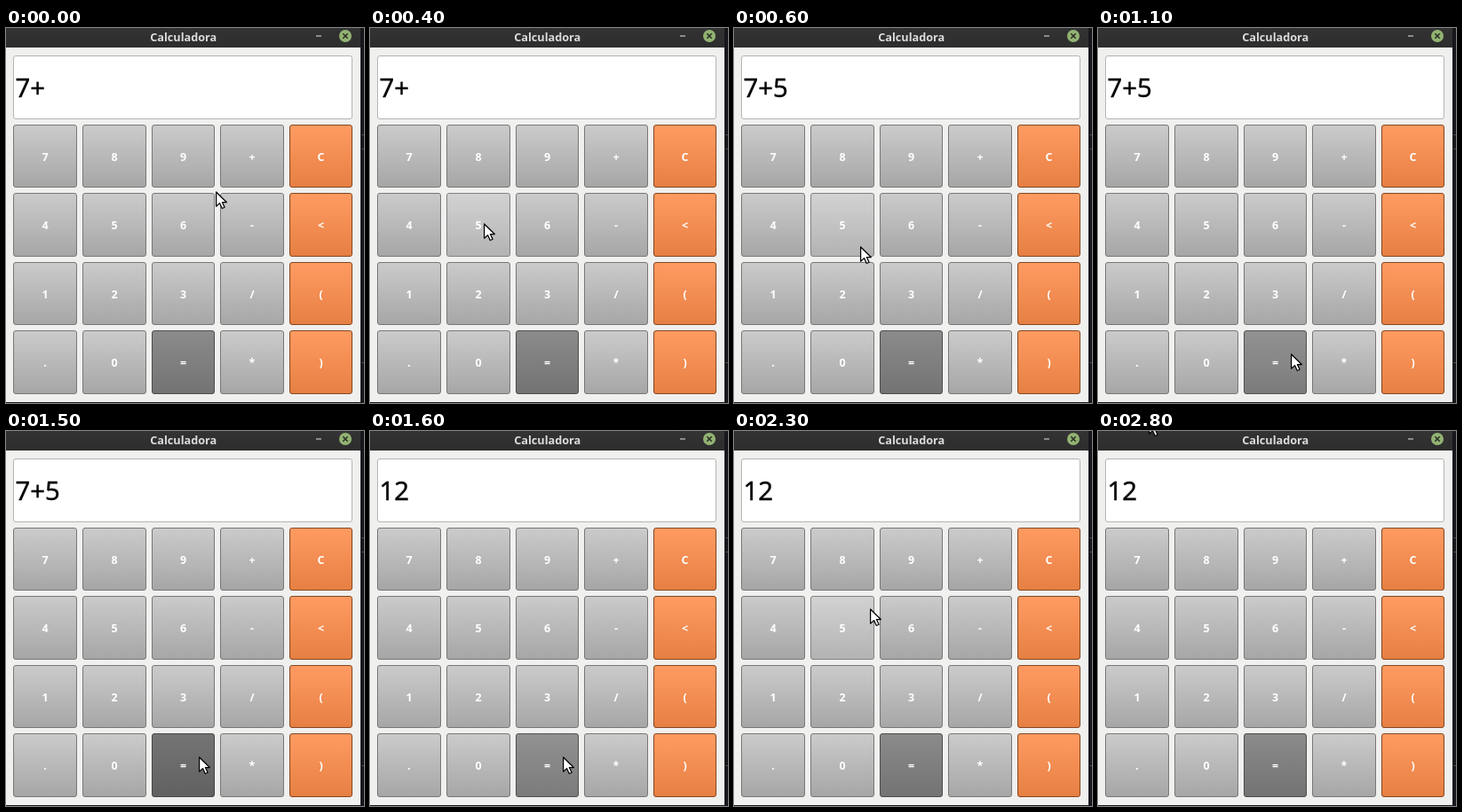
An HTML page that plays this animation: 403x423 px, repeating every 3200 ms.

```html
<!DOCTYPE html>
<html lang="pt">
<head>
<meta charset="utf-8">
<title>Calculadora</title>
<style>
  html, body { margin: 0; width: 100%; height: 100%; overflow: hidden; background: #18151b; }
  svg { display: block; width: 403px; height: 423px; font-family: "Noto Sans", "Open Sans", sans-serif; }
  .key rect { rx: 2.5px; stroke-width: 1; }
  .key text { font-size: 12.5px; font-weight: 700; fill: #fff; text-anchor: middle; }
  .plain rect { fill: url(#plain); stroke: #777; }
  .warm rect { fill: url(#warm); stroke: #84461f; }
  .dark rect { fill: url(#dark); stroke: #4c4c4c; }
  .key .glow { fill: #fff; fill-opacity: 0; stroke: none; }
  .key.hover .glow { fill-opacity: .14; }
  .dark.hover .glow { fill-opacity: .06; }
  .key.down .glow { fill: #000; fill-opacity: .16; }
</style>
</head>
<body>
<svg viewBox="0 0 403 423">
  <defs>
    <linearGradient id="plain" x2="0" y2="1"><stop stop-color="#cbcbcb"/><stop offset="1" stop-color="#a6a6a6"/></linearGradient>
    <linearGradient id="warm" x2="0" y2="1"><stop stop-color="#ff9b62"/><stop offset="1" stop-color="#e67f43"/></linearGradient>
    <linearGradient id="dark" x2="0" y2="1"><stop stop-color="#8b8b8b"/><stop offset="1" stop-color="#737373"/></linearGradient>
    <linearGradient id="bar" x2="0" y2="1"><stop stop-color="#333"/><stop offset="1" stop-color="#2d2d2d"/></linearGradient>
  </defs>

  <rect width="403" height="423" fill="#18151b"/>
  <path d="M400 120.5h3M400 136.5h3M400 377.5h3" stroke="#4a474e"/>
  <rect y="22" width="399" height="400" fill="#f0f0ef"/>
  <rect width="399" height="22" fill="url(#bar)"/>
  <text x="199.7" y="15" font-size="12.7" font-weight="600" fill="#dcdcdc" text-anchor="middle">Calculadora</text>
  <path d="M349 9h6" stroke="#a8a8a8" stroke-width="1.5"/>
  <circle cx="382" cy="9" r="7" fill="#92b372"/>
  <path d="M379.3 6.3l5.4 5.4m0-5.4l-5.4 5.4" stroke="#2b2f27" stroke-width="1.6"/>

  <rect x="8.5" y="31.5" width="381" height="71" rx="2.5" fill="#fff" stroke="#b4b4b4"/>
  <text id="display" x="10.5" y="78" font-size="29.33" stroke="#000" stroke-width=".35"></text>
  <g id="keys"></g>
  <path id="cursor" d="M.6 1V17.2L4.5 13.6 7.3 19.5 10.1 18.3 7.4 12.5H12.3Z"
        fill="#fff" stroke="#000" stroke-width="1.25" stroke-linejoin="round"/>
</svg>
<script>
const LOOP = 3200;
const STEP = 100;
const $ = id => document.getElementById(id);

// Pointer moves; it rests between them.
const home = { x: 236, y: 184 };
const moves = [
  { from: 0, to: 400, x: 128, y: 220 },
  { from: 400, to: 600, x: 142, y: 246 },
  { from: 600, to: 700, x: 215, y: 321 },
  { from: 800, to: 1100, x: 217, y: 367 },
  { from: 1800, to: 2300, x: 153, y: 200, ease: 2 },
  { from: 2300, to: 2500, x: 73, y: 63, ease: .8 },
  { from: 2700, to: 2800, x: 57, y: -14 }
];
// Each press lasts one step, then its result appears.
const taps = [{ at: 500, result: "7+5" }, { at: 1500, result: "12" }];

function add(parent, tag, attrs, text = "") {
  const el = document.createElementNS("http://www.w3.org/2000/svg", tag);
  for (const name in attrs) el.setAttribute(name, attrs[name]);
  el.textContent = text;
  return parent.appendChild(el);
}

// Equal cells with 6px gaps, snapped to whole pixels.
function span(start, size, index, snap) {
  const pos = start + index * (size + 6);
  return [snap(pos), snap(pos + size)];
}

const keys = [..."789+C456-<123/(.0=*)"].map((label, i) => {
  const col = i % 5;
  const [left, right] = span(8, 71.6, col, Math.ceil);
  const [top, bottom] = span(109, 71.5, Math.floor(i / 5), Math.floor);
  const kind = col === 4 ? "warm" : label === "=" ? "dark" : "plain";
  const el = add($("keys"), "g", { class: "key " + kind });
  const box = { x: left + .5, y: top + .5, width: right - left - 1, height: bottom - top - 1 };
  add(el, "rect", box);
  add(el, "rect", { ...box, class: "glow" });
  add(el, "text", { x: (left + right) / 2, y: top + 40.5 }, label);
  return { el, left, right, top, bottom };
});

function pointer(t) {
  let { x, y } = home;
  for (const m of moves) {
    const part = Math.min(1, Math.max(0, (t - m.from) / (m.to - m.from))) ** (m.ease || 1);
    x += (m.x - x) * part;
    y += (m.y - y) * part;
  }
  return [Math.round(x), Math.round(y)];
}

function draw(now) {
  const t = Math.floor(now % LOOP / STEP) * STEP;
  const [x, y] = pointer(t);
  const pressed = taps.some(tap => tap.at === t);
  const done = taps.filter(tap => tap.at < t).pop();
  $("cursor").setAttribute("transform", `translate(${x} ${y})`);
  $("display").textContent = done ? done.result : "7+";
  for (const key of keys) {
    const over = x >= key.left && x < key.right && y >= key.top && y < key.bottom;
    key.el.classList.toggle("hover", over);
    key.el.classList.toggle("down", over && pressed);
  }
}

const start = performance.now();
function tick() {
  draw(performance.now() - start);
  requestAnimationFrame(tick);
}
tick();
</script>
</body>
</html>
```
